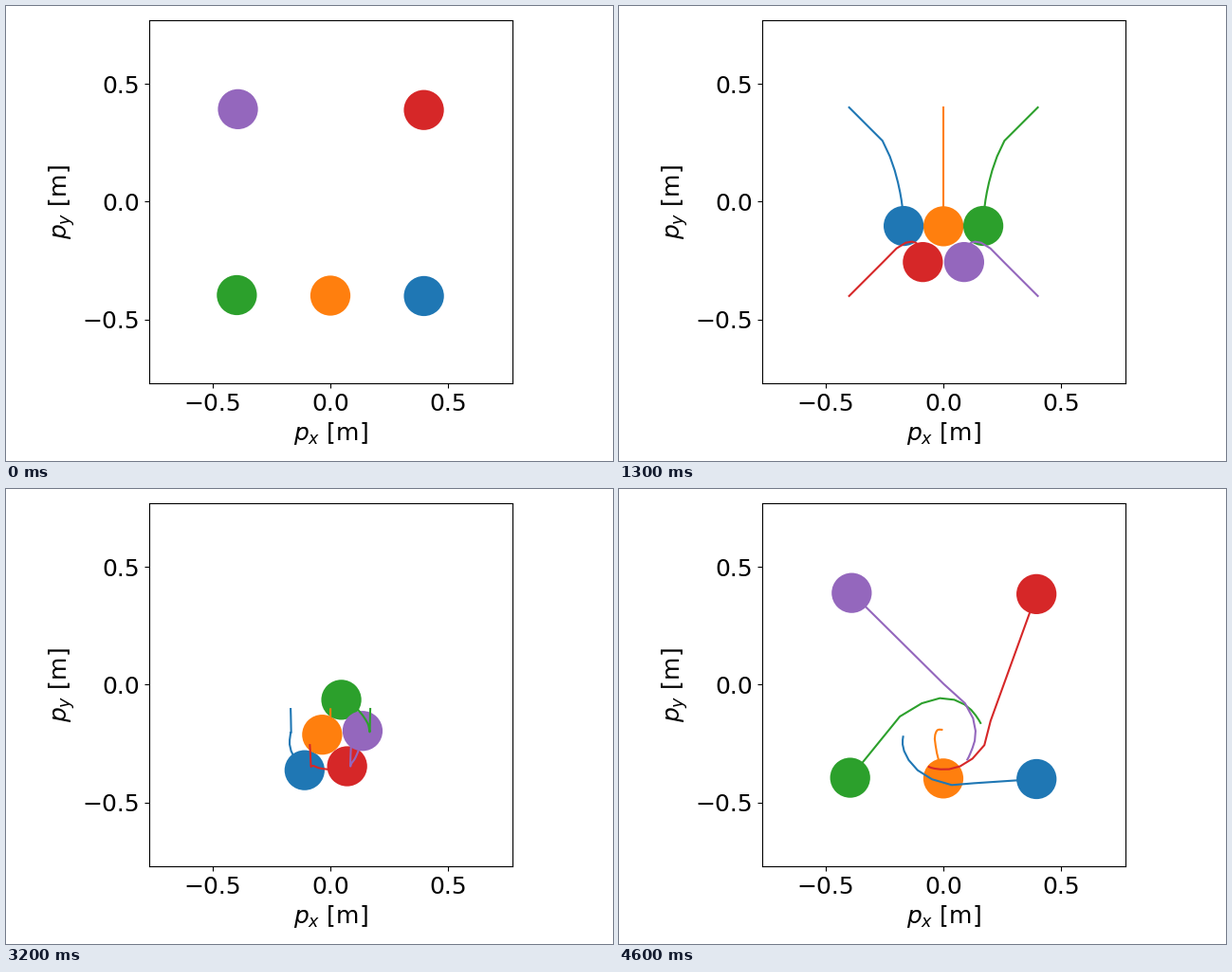
These frames come from a looping animation (640x480 px, 4.7 s). A matplotlib script:

```python
import numpy as np
import matplotlib.pyplot as plt
from matplotlib.animation import FuncAnimation

W, H, DPI = 640, 480, 100
FRAMES, INTERVAL = 47, 100
TAIL = 20
RADIUS = 0.085
LIMIT = 0.77

GAIN, TOP_SPEED = 0.3, 0.1
GAP = 1 / 6             # distance of agents in contact
MEET, PART = 3, 34      # steps between which the agents block each other
CLOSING = 0.66          # share of the spare distance left after each step
SPIN_RATE = 0.41

# Positions are complex numbers; agent 1 is the hub of the ring
start = 0.4 * np.array([-1 + 1j, 1j, 1 + 1j, -1 - 1j, 1 - 1j])
goal = -start
ring = GAP * np.array([-1, 0, 1, *np.exp(1j * np.radians([240, 300]))])
release = np.array([.157 - .128j, 0, -.157 + .155j, .228 + .137j, .029 + .293j])

# Hub way points: step, x, y
HUB = np.array([
    (3, 0, .2), (6, 0, .065), (11, 0, -.078), (15, 0, -.172), (18, 0, -.2),
    (22, -.002, -.197), (26, -.007, -.191), (30, -.031, -.2),
    (32, -.037, -.23), (34, -.028, -.29),
])


def hub(t):
    """Smooth curve through the hub way points."""
    keys, vals = HUB[:, 0], HUB[:, 1] + 1j * HUB[:, 2]
    slope = np.gradient(vals, keys)
    i = min(np.searchsorted(keys, t, side="right"), len(keys) - 1) - 1
    h = keys[i + 1] - keys[i]
    u = (t - keys[i]) / h
    ease = u * u * (3 - 2 * u)
    return (vals[i] + ease * (vals[i + 1] - vals[i])
            + h * u * (1 - u) * ((1 - u) * slope[i] - u * slope[i + 1]))


def seek(pos):
    """One step straight to the goal, with limited speed."""
    gap = goal - pos
    dist = np.maximum(np.abs(gap), 1e-9)
    return pos + gap * np.minimum(GAIN, TOP_SPEED / dist)


def circle_hub(t, spare):
    """The ring closes around the hub, then spins up and opens."""
    g = 2 / (1 + np.exp(SPIN_RATE * (PART - t)))
    r0, r1 = np.abs(ring), np.abs(release)
    swing = np.angle(release * ring.conj())
    turn = np.exp(1j * (np.angle(ring) + swing * g))
    offset = (r0 + (r1 - r0) * g**4) * turn
    return hub(t) + offset + spare * CLOSING ** (t - MEET)


def simulate():
    steps = [start, start]
    for t in range(2, FRAMES):
        if MEET < t <= PART:
            met = steps[MEET]
            steps.append(circle_hub(t, met - met[1] - ring))
        else:
            steps.append(seek(steps[-1]))
    return np.array(steps).T


paths = simulate()

fig = plt.figure(figsize=(W / DPI, H / DPI), dpi=DPI)
ax = fig.add_axes([150.65 / W, 82.1 / H, 382.9 / W, 382.9 / H])
ax.set(xlim=(-LIMIT, LIMIT), ylim=(-LIMIT, LIMIT),
       xticks=[-0.5, 0, 0.5], yticks=[-0.5, 0, 0.5])
ax.set_xlabel("$p_x$ [m]", fontsize=18)
ax.set_ylabel("$p_y$ [m]", fontsize=18)
ax.tick_params(labelsize=18)

discs, trails = [], []
for n in range(len(paths)):
    color = f"C{n}"
    discs.append(ax.add_patch(plt.Circle((0, 0), RADIUS, fc=color, lw=0)))
    trails += ax.plot([], [], color=color, lw=1.5)


def update(k):
    for path, disc, trail in zip(paths, discs, trails):
        here = path[k - 1]  # the loop opens on the final pose
        tail = path[max(0, k - TAIL):k]
        disc.center = here.real, here.imag
        trail.set_data(tail.real, tail.imag)
    return discs + trails


anim = FuncAnimation(fig, update, frames=FRAMES, interval=INTERVAL,
                     repeat=True, repeat_delay=0)
plt.show()
```
